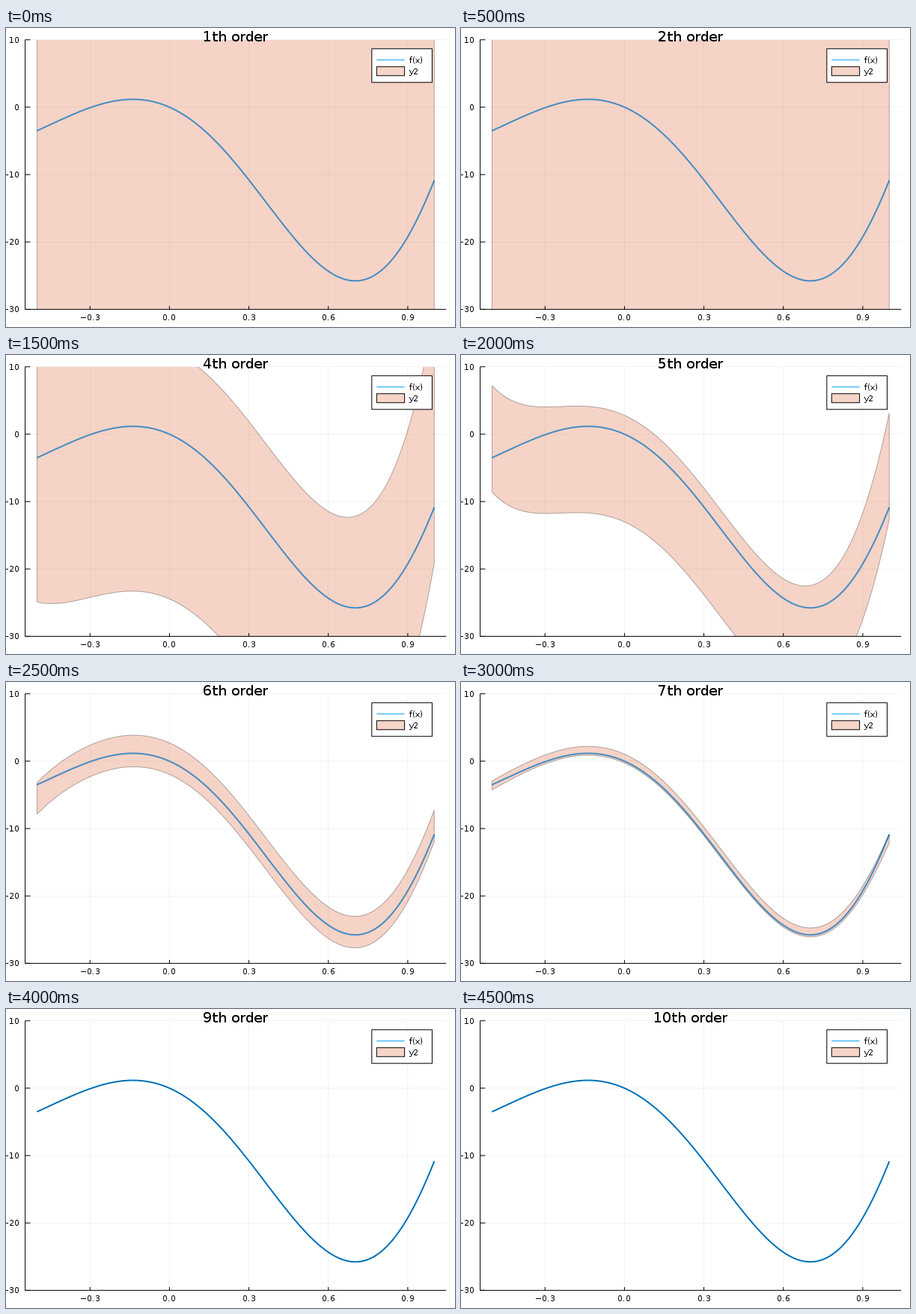
Animation of 600 by 400 pixels, one loop 5 s. Source, as a matplotlib script:

```python
import math

import numpy as np
import matplotlib.pyplot as plt
from matplotlib.animation import FuncAnimation
from matplotlib.patches import Polygon, Rectangle

plt.rcParams.update({
    "font.family": "DejaVu Sans",
    "text.hinting": "default",
    "text.hinting_factor": 1,
    "path.snap": False,
})

W, H, DPI = 600, 400, 100
PX = 72 / DPI
LEFT, RIGHT, TOP, BOTTOM = 25.59, 588.19, 15.75, 376.38
XLIM, YLIM = (-0.545, 1.045), (-30, 10)
BLUE, ORANGE = "#009AFA", (226 / 255, 111 / 255, 70 / 255)

# Taylor model of f around the middle of [LO, HI]
LO, HI = -0.5, 1.0
MID, RAD = (LO + HI) / 2, (HI - LO) / 2
ROOTS = (0, 1.1, -2, -2.2, -2.5, -3)
RATE, PHASE = 1.7, 0.5
U, U2 = np.array([-RAD, RAD]), np.array([0, RAD**2])


def f(x):
    return math.prod(x - r for r in ROOTS) * np.sin(RATE * x + PHASE)


def imul(a, b):
    p = np.outer(a, b)
    return np.array([p.min(), p.max()])


def horner(coeffs):
    total = np.zeros(2)
    for c in coeffs[::-1]:
        total = imul(total, U2) + c
    return total


def bound(coeffs):
    """Interval bound, even and odd powers taken apart."""
    return horner(coeffs[::2]) + imul(horner(coeffs[1::2]), U)


def multiply(a, b):
    (pa, ra), (pb, rb) = a, b
    n = len(pa)
    full = np.convolve(pa, pb)
    tail = full.copy()
    tail[:n] = 0
    rem = bound(tail) + imul(bound(pb), ra) + imul(bound(pa), rb) + imul(ra, rb)
    return full[:n], rem


def linear(root, order):
    poly = np.zeros(order + 1)
    poly[:2] = MID - root, 1
    return poly, np.zeros(2)


def sine(order):
    centre = RATE * MID + PHASE
    poly = np.array([math.sin(centre + k * math.pi / 2) * RATE**k / math.factorial(k)
                     for k in range(order + 1)])
    m = order + 1
    arg = np.linspace(RATE * LO + PHASE, RATE * HI + PHASE, 2001)
    slope = np.sin(arg + m * math.pi / 2) / math.factorial(m)
    w = (RATE * RAD) ** m
    power = np.array([-w if m % 2 else 0, w])
    return poly, imul([slope.min(), slope.max()], power)


def band(order):
    model = linear(ROOTS[0], order)
    for r in ROOTS[1:]:
        model = multiply(model, linear(r, order))
    poly, rem = multiply(model, sine(order))
    x = np.linspace(LO, HI, 100)
    y = np.polyval(poly[::-1], x - MID)
    return np.column_stack([np.r_[x, x[::-1]],
                            np.r_[y + rem[0], (y + rem[1])[::-1]]])


fig = plt.figure(figsize=(W / DPI, H / DPI), dpi=DPI, facecolor="white")
ax = fig.add_axes([LEFT / W, 1 - BOTTOM / H, (RIGHT - LEFT) / W, (BOTTOM - TOP) / H])
ax.set(xlim=XLIM, ylim=YLIM)
ax.axis("off")

# Overlay measured in pixels from the top left
top = fig.add_axes([0, 0, 1, 1], zorder=2)
top.set(xlim=(0, W), ylim=(H, 0))
top.axis("off")


def stroke(x, y, color="black", zorder=2):
    top.plot(x, y, color=color, lw=PX, solid_capstyle="butt", zorder=zorder)


def label(x, y, text, ha="center", size=8):
    return top.text(x, y, text, ha=ha, va="baseline", size=size, zorder=5)


def box(x0, y0, x1, y1, color):
    top.add_patch(Rectangle((x0, y0), x1 - x0, y1 - y0, fc=color, ec="black",
                            lw=PX, zorder=3))


def minus(text):
    return text.replace("-", "\u2212")


grid = dict(color="black", alpha=0.1, lw=0.5 * PX, zorder=1)

for v in (-0.3, 0.0, 0.3, 0.6, 0.9):
    px = LEFT + (v - XLIM[0]) / (XLIM[1] - XLIM[0]) * (RIGHT - LEFT)
    ax.axvline(v, **grid)
    stroke([px, px], [BOTTOM, BOTTOM - 4.4])
    label(px, 391, minus(f"{v:.1f}"))

for v in range(-30, 11, 10):
    py = BOTTOM - (v - YLIM[0]) / (YLIM[1] - YLIM[0]) * (BOTTOM - TOP)
    ax.axhline(v, clip_on=False, **grid)
    stroke([LEFT, LEFT + 6.8], [py, py])
    label(18.4, py + 4, minus(str(v)), ha="right")

stroke([LEFT, LEFT], [TOP, BOTTOM])
stroke([LEFT, RIGHT], [BOTTOM, BOTTOM])

xs = np.linspace(LO, HI, 400)
ax.plot(xs, f(xs), color=BLUE, lw=2 * PX, solid_capstyle="butt", zorder=2)
shape = ax.add_patch(Polygon(band(1), closed=True, fc=(*ORANGE, 0.3),
                             ec=(0, 0, 0, 0.3), lw=PX, zorder=3))

# Legend: two rows, inset by a thirtieth of the plot area
ROW = 15
leg_right = RIGHT - (RIGHT - LEFT) / 30
leg_top = TOP + (BOTTOM - TOP) / 30
row1, row2 = leg_top + ROW, leg_top + 2 * ROW
box(488.8, leg_top, leg_right, leg_top + 3 * ROW, "white")
box(495.3, row2 - 6, 532.6, row2 + 6, [0.7 + 0.3 * c for c in ORANGE])
stroke([495.3, 532.6], [row1, row1], BLUE, zorder=4)
label(539, row1 + 4, "f(x)", ha="left")
label(539, row2 + 4, "y2", ha="left")

title = label((LEFT + RIGHT) / 2 - 0.4, 18, "", size=14)


def draw(i):
    shape.set_xy(band(i + 1))
    title.set_text(f"{i + 1}th order")
    return shape, title


anim = FuncAnimation(fig, draw, frames=10, interval=500, repeat=True, repeat_delay=0)
plt.show()
```
